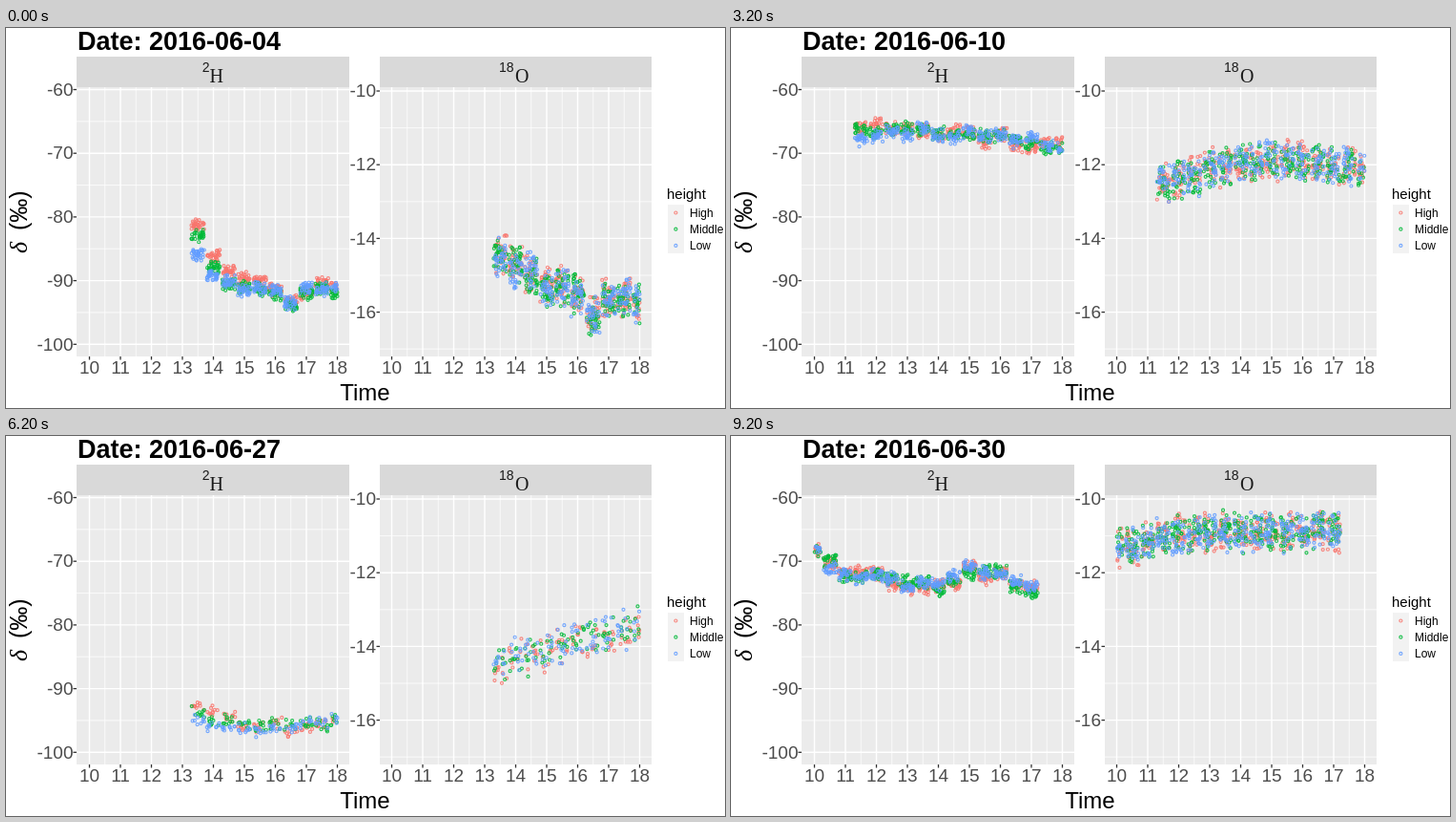
An HTML page with a canvas that plays this animation: 754 by 398 pixels, repeating every 10 s.

```html
<!DOCTYPE html>
<html lang="en">
<head>
<meta charset="utf-8">
<title>Isotope ratios by day</title>
<style>
  html, body { margin: 0; width: 100%; height: 100%; overflow: hidden; background: #fff; }
  svg, canvas { position: absolute; left: 0; top: 0; width: 754px; height: 398px; }
  text { font-family: "Liberation Sans", Arial, sans-serif; }
  .serif { font-family: "Liberation Serif", "Times New Roman", serif; }
</style>
</head>
<body>
<svg id="chart" width="754" height="398" viewBox="0 0 754 398"></svg>
<canvas id="dots" width="754" height="398"></canvas>
<script>
const LOOP = 10000;
const COLORS = ['#F8766D', '#00BA38', '#619CFF'];
const HEIGHTS = ['High', 'Middle', 'Low'];
const TOP = 62, BOTTOM = 344;
const DOT = { radius: 1.5, width: 1.2, alpha: .85 };

// Each panel runs from its first major value downwards in equal steps.
const panels = [
  { key: 'h', left: 74, right: 360, x10: 87.5, y0: 64.5, unit: 6.67, first: -60, step: 10, majors: 5,
    labelEnd: 70.5, mass: '2', massX: 205.7, element: 'H', elementX: 213.5, spread: 1.2, wobble: 1.6 },
  { key: 'o', left: 392, right: 677, x10: 404.5, y0: 66, unit: 38.6, first: -10, step: 2, majors: 4,
    labelEnd: 388, mass: '18', massX: 517, element: 'O', elementX: 534, spread: .6, wobble: .2 },
];
const hourX = (p, hour) => p.x10 + (hour - 10) * 32.5;
const valueY = (p, v) => p.y0 + (p.first - v) * p.unit;

// from, to: first and last half-hour block; count: dots per block and height;
// h, o: key levels evenly spaced over the day; gap: how far High starts above Low.
const days = [
  { date: '04', from: 13.5, to: 18, count: 32, gap: 4,
    h: [-85.7, -89.8, -90.9, -90.8, -93.7, -90.5, -91.3], o: [-14.45, -14.9, -15.25, -15.2, -16.1, -15.5, -15.75] },
  { date: '05', from: 11, to: 17, count: 28, gap: 1.5, h: [-91, -89.6, -88], o: [-15, -14.8, -14.4] },
  { date: '06', from: 10.5, to: 17, count: 32, gap: 1.5,
    h: [-62, -67, -67.4, -69.8, -68.3, -70.3], o: [-11.7, -11.6, -11.7, -12, -11.7, -12.1] },
  { date: '10', from: 11.5, to: 18, count: 24, gap: 2,
    h: [-67.4, -66.8, -67.2, -67.9, -69], o: [-12.5, -12.05, -11.9, -11.95, -12.1] },
  { date: '11', from: 11, to: 18, count: 22, gap: 1.5, h: [-98.5, -95.6, -92], o: [-15.9, -15.7, -15.4] },
  { date: '12', from: 10, to: 14.5, count: 17, gap: .2,
    h: [-89.9, -90.7, -89.5, -87.3], o: [-15.25, -15.25, -15.15, -14.75] },
  { date: '27', from: 13.5, to: 18, count: 10, gap: 1.8,
    h: [-94.8, -95.9, -96.1, -95.3], o: [-14.4, -14.05, -13.7, -13.5] },
  { date: '28', from: 10.5, to: 18, count: 24, gap: 1.4, h: [-82.5, -80.2, -77.6], o: [-12.9, -12.6, -12.3] },
  { date: '29', from: 10.5, to: 18, count: 32, gap: 1.8,
    h: [-75.9, -79.6, -78.6, -77.6, -83, -80.6], o: [-12, -11.95, -11.45, -11.35, -11.8, -11.5] },
  { date: '30', from: 10, to: 17, count: 26, gap: .4,
    h: [-68.7, -72.3, -72.6, -73.7, -74.1, -71.6, -72.2, -74.3], o: [-11.3, -10.9, -10.95, -10.8] },
];

function seeded(seed) {
  return () => {
    seed = (seed + 0x6D2B79F5) | 0;
    let r = Math.imul(seed ^ (seed >>> 15), 1 | seed);
    r = (r + Math.imul(r ^ (r >>> 7), 61 | r)) ^ r;
    return ((r ^ (r >>> 14)) >>> 0) / 4294967296;
  };
}

// Linear interpolation through evenly spaced keys, f from 0 to 1.
function along(keys, f) {
  const pos = f * (keys.length - 1);
  const i = Math.min(Math.floor(pos), keys.length - 2);
  return keys[i] + (keys[i + 1] - keys[i]) * (pos - i);
}

const rect = (x, y, w, h, fill) => `<rect x="${x}" y="${y}" width="${w}" height="${h}" fill="${fill}"/>`;
const line = (x1, y1, x2, y2, color, width) =>
  `<line x1="${x1}" y1="${y1}" x2="${x2}" y2="${y2}" stroke="${color}" stroke-width="${width}"/>`;
const text = (x, y, size, str, extra = '') =>
  `<text x="${x}" y="${y}" font-size="${size}" ${extra}>${str}</text>`;
const ring = (x, y, color) =>
  `<circle cx="${x}" cy="${y}" r="${DOT.radius}" fill="none" stroke="${color}"
    stroke-width="${DOT.width}" stroke-opacity="${DOT.alpha}"/>`;

function panelSvg(p) {
  const w = p.right - p.left;
  const vLine = (x, width) => line(x, TOP, x, BOTTOM, '#fff', width);
  const hLine = (y, width) => line(p.left, y, p.right, y, '#fff', width);
  let s = rect(p.left, 30, w, TOP - 30, '#D9D9D9') + rect(p.left, TOP, w, BOTTOM - TOP, '#EBEBEB');
  s += text(p.massX, 46, 14, p.mass, 'fill="#1A1A1A"');
  s += text(p.elementX, 57, 20, p.element, 'fill="#1A1A1A" class="serif"');
  for (let i = 0; i < p.majors; i++) {
    const v = p.first - i * p.step;
    const y = valueY(p, v), mid = valueY(p, v - p.step / 2);
    s += hLine(y, 1.4) + line(p.left - 3.5, y, p.left, y, '#333', 1.3);
    if (mid < BOTTOM) s += hLine(mid, .75);
    s += text(p.labelEnd, Math.round(y + 6.2), 19, v, 'fill="#4D4D4D" text-anchor="end"');
  }
  for (let hour = 10; hour <= 18; hour++) {
    const x = hourX(p, hour);
    s += vLine(x, 1.4) + line(x, BOTTOM, x, BOTTOM + 3.5, '#333', 1.3);
    if (hour < 18) s += vLine(hourX(p, hour + .5), .75);
    s += text(x, 362, 19, hour, 'fill="#4D4D4D" text-anchor="middle"');
  }
  return s;
}

function legendSvg() {
  let s = text(693, 179, 15, 'height') + rect(694, 185, 17, 51, '#F2F2F2');
  HEIGHTS.forEach((name, i) => {
    s += ring(702.4, 193.5 + 17.2 * i, COLORS[i]) + text(717, 198 + 17 * i, 12, name);
  });
  return s;
}

document.getElementById('chart').innerHTML =
  panels.map(panelSvg).join('') + legendSvg() +
  text(75, 23, 27, '', 'id="title" font-weight="bold"') +
  text(376.5, 390, 24, 'Time', 'text-anchor="middle"') +
  '<g transform="translate(22 236) rotate(-90)">' +
  text(0, 0, 26, 'δ', 'class="serif" font-style="italic"') + text(24, 0, 25, '(‰)') + '</g>';

const title = document.getElementById('title');
const ctx = document.getElementById('dots').getContext('2d');

function drawDay(index) {
  const day = days[index];
  const rand = seeded(71 + index * 13);
  const last = (day.to - day.from) * 2;
  title.textContent = 'Date: 2016-06-' + day.date;
  ctx.clearRect(0, 0, 754, 398);
  ctx.globalAlpha = DOT.alpha;
  ctx.lineWidth = DOT.width;
  for (const p of panels) {
    for (let block = 0; block <= last; block++) {
      const level = along(day[p.key], block / last);
      COLORS.forEach((color, c) => {
        // Higher inlets start further above Low and close in on it.
        const gap = p.key === 'h' ? day.gap * (1 - c / 2) * Math.exp(-block / 1.5) : 0;
        const center = level + gap + (rand() - .5) * p.wobble;
        ctx.strokeStyle = color;
        for (let i = 0; i < day.count; i++) {
          const hour = day.from + block / 2 + (rand() - .5) * .42;
          const v = center + (rand() + rand() - 1) * p.spread;
          if (hour < 10 || hour > 18) continue;
          ctx.beginPath();
          ctx.arc(hourX(p, hour), valueY(p, v), DOT.radius, 0, 2 * Math.PI);
          ctx.stroke();
        }
      });
    }
  }
}

// The first day holds 100 ms longer than the others.
const dayAt = t => Math.max(0, Math.floor((t - 100) / 1000));

const begin = performance.now();
let shown = -1;
function tick() {
  const index = dayAt((performance.now() - begin) % LOOP);
  if (index !== shown) drawDay(shown = index);
  requestAnimationFrame(tick);
}
tick();
</script>
</body>
</html>
```
